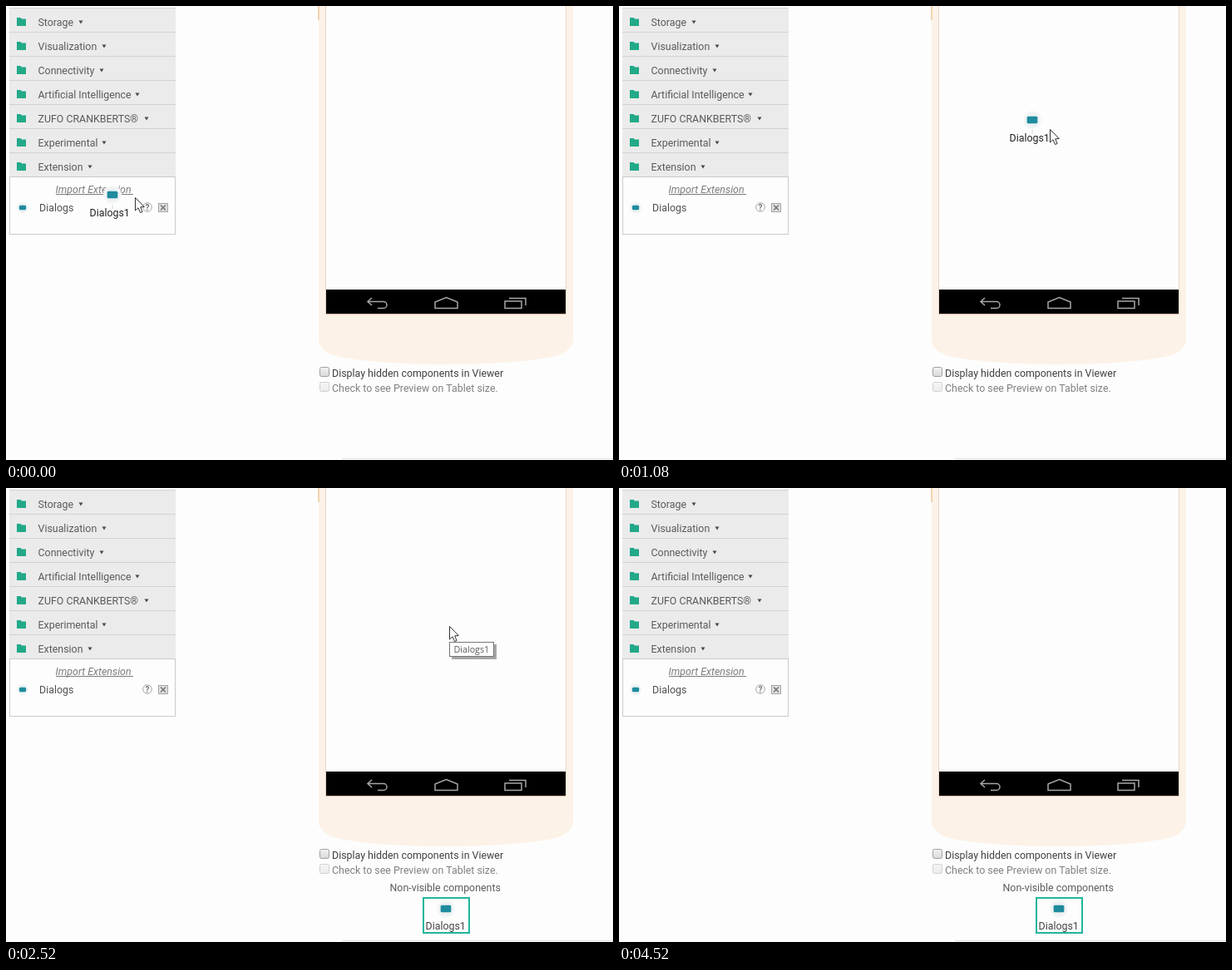
Recreate the animation shown at these times as an HTML page with a canvas. Size 730x546 px, loop 4.6 s.

```html
<!DOCTYPE html>
<html lang="en">
<head>
<meta charset="utf-8">
<title>Drag a component</title>
<style>
html, body { margin: 0; width: 100%; height: 100%; overflow: hidden; background: #fdfdfd; }
canvas { display: block; }
</style>
</head>
<body>
<canvas id="stage" width="730" height="546"></canvas>
<script>
const ctx = document.getElementById('stage').getContext('2d');
const LOOP = 4600, STEP = 40;
const DROP = 1840, TIP_ON = 2440, TIP_SWAP = 3040, TIP_OFF = 3480;
const UI = '12.4px Roboto, sans-serif';
const PAPER = '#fdfdfd', PANEL = '#ebebeb', EDGE = '#d2d2d2', GREEN = '#20b59c';

// Keys are [time, x, y]
const cursorKeys = [[0, 155, 230], [600, 424, 151], [1080, 518, 148], [1400, 533, 166],
  [3000, 533, 166], [3320, 575, 178], [3600, 746, 212]];
const ghostKeys = [[0, 128, 227], [600, 387, 167], [1080, 497, 137], [1440, 512, 157]];

// Name, arrow position
const rows = [['Storage', 90], ['Visualization', 118], ['Connectivity', 115],
  ['Artificial Intelligence', 158], ['ZUFO CRANKBERTS®', 169], ['Experimental', 118], ['Extension', 101]];

function along(keys, t, axis) {
  const last = keys.length - 1;
  if (t >= keys[last][0]) return keys[last][axis];
  let i = 0;
  while (t >= keys[i + 1][0]) i++;
  const slope = k => (keys[k + 1][axis] - keys[k][axis]) / (keys[k + 1][0] - keys[k][0]);
  const tangent = k => {
    if (k === 0) return slope(0);
    if (k === last) return slope(last - 1);
    const a = slope(k - 1), b = slope(k);
    return a * b > 0 ? 2 * a * b / (a + b) : 0;
  };
  const span = keys[i + 1][0] - keys[i][0], u = (t - keys[i][0]) / span, v = 1 - u;
  return keys[i][axis] * (1 + 2 * u) * v * v + keys[i + 1][axis] * u * u * (3 - 2 * u) +
    span * (tangent(i) * u * v * v - tangent(i + 1) * u * u * v);
}

function box(x, y, w, h, color) {
  ctx.fillStyle = color;
  ctx.fillRect(x, y, w, h);
}

function frame(x, y, w, h, color, width = 1) {
  ctx.strokeStyle = color;
  ctx.lineWidth = width;
  ctx.strokeRect(x + width / 2, y + width / 2, w - width, h - width);
}

function label(text, x, y, color, font = UI) {
  ctx.font = font;
  ctx.fillStyle = color;
  ctx.fillText(text, x, y);
}

function trace(points, close) {
  ctx.beginPath();
  points.forEach(([x, y]) => ctx.lineTo(x, y));
  if (close) ctx.closePath();
}

function icon(x, y, size) {
  const glow = ctx.createRadialGradient(x, y, size * 0.5, x, y, size);
  glow.addColorStop(0, '#eaf0f2');
  glow.addColorStop(0.8, '#f4f6f7');
  glow.addColorStop(1, 'rgba(253,253,253,0)');
  ctx.fillStyle = glow;
  ctx.beginPath();
  ctx.arc(x, y, size, 0, 7);
  ctx.fill();
  const w = size * 1.1, h = size * 0.75;
  ctx.beginPath();
  ctx.roundRect(x - w / 2, y - h / 2, w, h, 1.5);
  ctx.fillStyle = '#1f8b9e';
  ctx.fill();
}

function sidebar() {
  box(4, 2, 200, 204, PANEL);
  rows.forEach(([name, arrow], i) => {
    const y = 2 + i * 29;
    box(4, y, 200, 1, EDGE);
    trace([[13, y + 12], [17.5, y + 12], [19, y + 13.5], [24, y + 13.5], [24, y + 22], [13, y + 22]], true);
    ctx.fillStyle = '#22a988';
    ctx.fill();
    label(name, 38.5, y + 21.5, '#5a5a5a');
    trace([[arrow - 2.5, y + 15.5], [arrow + 2.5, y + 15.5], [arrow, y + 19.5]], true);
    ctx.fillStyle = '#4a4a4a';
    ctx.fill();
  });
  box(4, 205, 200, 70, PAPER);
  frame(4, 205, 200, 70, '#cbcbcb');

  label('Import Extension', 59.5, 225, '#7c7c7c', 'italic ' + UI);
  box(60, 226, 93, 1, '#7c7c7c');
  icon(20, 242.5, 7.5);
  label('Dialogs', 40, 246.5, '#505050');

  ctx.strokeStyle = '#a8a8a8';
  ctx.lineWidth = 1;
  ctx.beginPath();
  ctx.arc(170, 242, 5.3, 0, 7);
  ctx.stroke();
  label('?', 167.4, 245.7, '#777', 'bold 10px Roboto, sans-serif');
  box(183, 237, 12, 11, '#e2e2e2');
  frame(183, 237, 12, 11, '#a3a3a3');
  ctx.strokeStyle = '#757575';
  ctx.lineWidth = 1.6;
  trace([[186, 239.5], [192, 245.5]]);
  ctx.stroke();
  trace([[192, 239.5], [186, 245.5]]);
  ctx.stroke();
}

function phone() {
  ctx.beginPath();
  ctx.moveTo(376, -2);
  ctx.lineTo(376, 403);
  ctx.quadraticCurveTo(379, 417, 401, 422);
  ctx.bezierCurveTo(465, 434, 593, 434, 657, 422);
  ctx.quadraticCurveTo(679, 417, 682, 403);
  ctx.lineTo(682, -2);
  ctx.fillStyle = '#fcf2e7';
  ctx.fill();
  box(375, 0, 2, 17, '#f2d3b0');
  box(384, 0, 290, 371, '#e8d6c6');
  box(385, 0, 288, 341, PAPER);
  box(385, 341, 288, 29, '#000');
  box(385, 370, 288, 1, '#d3b8a6');

  ctx.strokeStyle = '#a6a6a6';
  ctx.lineWidth = 1.5;
  ctx.beginPath();
  ctx.moveTo(440, 351);
  ctx.lineTo(435, 355.5);
  ctx.lineTo(440, 360);
  ctx.moveTo(435, 355.5);
  ctx.lineTo(454, 355.5);
  ctx.arc(454, 359.5, 4, -Math.PI / 2, Math.PI / 2);
  ctx.lineTo(447, 363.5);
  ctx.stroke();
  trace([[516, 363.5], [516, 356], [529.5, 350.5], [543, 356], [543, 363.5]], true);
  ctx.stroke();
  ctx.strokeRect(600, 355, 20, 8.5);
  trace([[605, 351.5], [625, 351.5], [625, 360]]);
  ctx.stroke();
}

function checkbox(y, top, bottom, border) {
  const fill = ctx.createLinearGradient(0, y, 0, y + 12);
  fill.addColorStop(0, top);
  fill.addColorStop(1, bottom);
  ctx.beginPath();
  ctx.roundRect(377.5, y + 0.5, 11, 11, 2);
  ctx.fillStyle = fill;
  ctx.fill();
  ctx.strokeStyle = border;
  ctx.lineWidth = 1;
  ctx.stroke();
}

function viewer() {
  phone();
  checkbox(434, '#f3f3f3', '#d8d8d8', '#a0a0a0');
  label('Display hidden components in Viewer', 392, 446, '#404040');
  checkbox(452, '#f6f6f6', '#ebebeb', '#d0d0d0');
  label('Check to see Preview on Tablet size.', 392, 464, '#808080');
  box(404, 544, 326, 1, '#dedede');
}

function dropped() {
  label('Non-visible components', 461.5, 484.5, '#5c5c5c');
  frame(501, 492, 57, 44, GREEN, 2);
  icon(529, 506, 11.5);
  label('Dialogs1', 504.5, 531, '#444');
}

function ghost(x, y) {
  icon(x, y, 11.5);
  box(x - 1, y + 12, 2, 5, '#e6eaec');
  label('Dialogs1', x - 27.5, y + 26, '#222');
}

function tooltip(text, w) {
  box(536, 188, w, 18, '#a6a6a6');
  box(533, 185, w, 18, '#fdfdfd');
  frame(533, 185, w, 18, '#767676');
  label(text, 538.5, 198, '#5c5c5c', '10.7px "Open Sans", "Noto Sans", sans-serif');
}

function pointer(x, y) {
  ctx.save();
  ctx.translate(x + 0.5, y + 0.5);
  trace([[0, 0], [0, 15.5], [3.5, 12.3], [6, 18], [8.6, 17], [6.2, 11.3], [10.8, 11]], true);
  ctx.fillStyle = '#fdfdfd';
  ctx.fill();
  ctx.strokeStyle = '#333';
  ctx.lineWidth = 1;
  ctx.stroke();
  ctx.restore();
}

function draw(now) {
  const t = Math.floor(now % LOOP / STEP) * STEP;
  box(0, 0, 730, 546, PAPER);
  sidebar();
  viewer();
  if (t < DROP) ghost(along(ghostKeys, t, 1), along(ghostKeys, t, 2));
  else dropped();
  if (t >= TIP_ON && t < TIP_SWAP) tooltip('Dialogs1', 54);
  else if (t >= TIP_SWAP && t < TIP_OFF) tooltip('Screen1', 50);
  pointer(Math.round(along(cursorKeys, t, 1)), Math.round(along(cursorKeys, t, 2)));
}

const start = performance.now();
function tick() {
  draw(performance.now() - start);
  requestAnimationFrame(tick);
}
tick();
</script>
</body>
</html>
```
